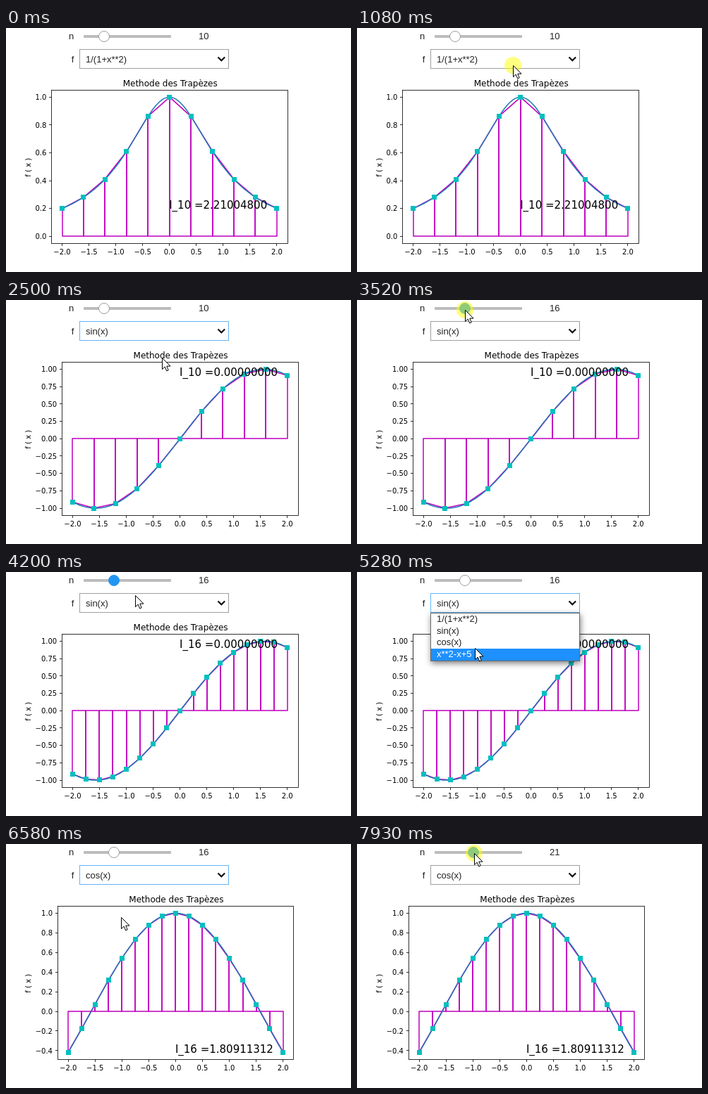
An HTML page that plays this animation: 489 px wide and 347 px high, repeating every 8000 ms.

```html
<!DOCTYPE html>
<html lang="fr">
<head>
<meta charset="utf-8">
<title>Methode des Trapèzes</title>
<style>
  html, body { margin: 0; width: 100%; height: 100%; overflow: hidden; background: #fff; }
  svg { display: block; }
  .ui text { font: 13px "Liberation Sans", Arial, sans-serif; fill: #222; }
  .plot text { font: 10px "DejaVu Sans", sans-serif; fill: #000; }
  .plot .title { font-size: 12px; }
  .plot .sum { font-size: 15px; }
  .end { text-anchor: end; }
  .mid { text-anchor: middle; }
  .axis { fill: none; stroke: #000; stroke-width: .8; }
  .trap { fill: none; stroke: #bf00bf; stroke-width: 1.5; stroke-linejoin: round; }
  .curve { fill: none; stroke: #1f77b4; stroke-width: 1.5; }
  #menu { filter: drop-shadow(1px 3px 4px rgba(0, 0, 0, .5)); }
</style>
</head>
<body>
<svg width="489" height="347" viewBox="0 0 489 347">
  <g id="plots"></g>
  <g class="ui">
    <text class="end" x="96.3" y="16">n</text>
    <rect x="110" y="10" width="124" height="4" rx="1" fill="#bdbdbd"/>
    <circle id="knob" cy="12" r="7.5"/>
    <text id="count" x="273" y="16"></text>
    <text class="end" x="96.3" y="49">f</text>
    <rect id="box" x="104.5" y="30.5" width="211" height="27" fill="#fff"/>
    <text id="choice" x="113" y="49"></text>
    <path d="M300.5 41.5L305.3 46.3L310.1 41.5" fill="none" stroke="#000" stroke-width="2"/>
    <g id="menu">
      <rect x="104.5" y="58.5" width="211" height="68" fill="#fff" stroke="#6b6b6b"/>
      <rect id="bar" x="105" width="210" height="17" fill="#1e90ff"/>
    </g>
  </g>
  <circle id="halo" r="12" fill="#ff0" fill-opacity=".5"/>
  <path id="arrow" d="M.5 .5V16.6L4.2 13.1L6.7 18.9L9.2 17.8L6.8 12.1H12Z" fill="#fff" stroke="#000"/>
</svg>
<script>
const $ = id => document.getElementById(id);
const LOOP = 8000, STEP = 70, ROW = 16.6, MENU_TOP = 58;
const names = ["1/(1+x**2)", "sin(x)", "cos(x)", "x**2-x+5"];

// Axes geometry in pixels; x covers -2.2 to 2.2
const TOP = 88.5, BOTTOM = 306, WIDTH = 334.8, MID = (TOP + BOTTOM) / 2;

const bell = { f: x => 1 / (1 + x * x), left: 64.3, min: 0, first: 0, step: .2, digits: 1 };
const sine = { f: Math.sin, left: 79.2, min: -1, first: -1, step: .25, digits: 2 };
const cosine = { f: Math.cos, left: 73, min: Math.cos(2), first: -.4, step: .2, digits: 1 };

const range = (n, fn) => Array.from({ length: n + 1 }, (_, i) => fn(i));
const fixed = (v, digits) => v.toFixed(digits).replace(/^-(0\.?0*)$/, "$1").replace("-", "\u2212");
const snap = v => Math.floor(v) + .5;

function drawPlot({ f, left, min, first, step, digits }, n) {
  const px = x => left + (x + 2.2) / 4.4 * WIDTH;
  const unit = (BOTTOM - TOP) / 1.1 / (1 - min);
  const py = y => BOTTOM - (BOTTOM - TOP) / 22 - (y - min) * unit;
  const at = (x, y) => px(x).toFixed(2) + " " + py(y).toFixed(2);
  const h = 4 / n, xs = range(n, i => -2 + i * h);
  const sum = xs.reduce((s, x, i) => s + f(x) * h * (i % n ? 1 : .5), 0);
  const center = left + WIDTH / 2, base = Math.round(py(0));
  let out = "";

  // Upright and level edges sit on whole pixels
  for (let i = 0; i < n; i++) {
    const [a, b] = [xs[i], xs[i + 1]];
    const [ax, bx] = [a, b].map(x => Math.round(px(x)));
    out += `<path class="trap" d="M${ax} ${base}V${py(f(a))}L${bx} ${py(f(b))}V${base}Z"/>`;
  }
  out += `<path class="curve" d="M${range(100, i => at(i / 25 - 2, f(i / 25 - 2))).join("L")}"/>`;
  for (const x of xs) {
    out += `<rect x="${Math.round(px(x) - 3.5)}" y="${Math.round(py(f(x)) - 3.5)}" width="7" height="7" fill="#00bfbf"/>`;
  }

  const edge = snap(left);
  out += `<rect class="axis" x="${edge}" y="${TOP}" width="${snap(left + WIDTH) - edge}" height="218"/>`;
  for (let x = -2; x <= 2; x += .5) {
    out += `<path class="axis" d="M${snap(px(x))} 306.5v3.5"/>
      <text class="mid" x="${px(x)}" y="321.5">${fixed(x, 1)}</text>`;
  }
  for (let y = first; y < 1.01; y += step) {
    out += `<path class="axis" d="M${edge} ${snap(py(y))}h-3.5"/>
      <text class="end" x="${left - 7}" y="${Math.round(py(y) + 3.8)}">${fixed(y, digits)}</text>`;
  }
  out += `<text class="mid" transform="translate(34.7 ${MID + 1}) rotate(-90)">f ( x )</text>
    <text class="title mid" x="${center + 1}" y="83">Methode des Trapèzes</text>
    <text class="sum" x="${px(0) - .5}" y="${Math.round(py(f(2)) + .8)}">I_${n} =${Math.abs(sum).toFixed(8)}</text>`;
  return `<g class="plot">${out}</g>`;
}

$("plots").innerHTML = [[bell, 10], [sine, 10], [sine, 16], [cosine, 16]].map(p => drawPlot(...p)).join("");
const plots = [...$("plots").children];

const svgNS = "http://www.w3.org/2000/svg";
const items = names.map((name, i) => {
  const el = document.createElementNS(svgNS, "text");
  el.setAttribute("x", 113);
  el.setAttribute("y", Math.round(71 + i * ROW));
  el.textContent = name;
  $("menu").append(el);
  return el;
});

// Pointer legs: start time, number of steps, end point, ease-out power
const legs = [
  [250, 10, 221, 53, 1.6],
  [1540, 7, 221, 82, 1.4],
  [2770, 4, 161, 25, 1.4],
  [3180, 3, 153, 14, 1],
  [3920, 5, 183, 33, 1],
  [4270, 3, 197, 37, 1],
  [5140, 3, 167, 108, 1.3],
  [5350, 2, 165, 115, 1],
  [5620, 4, 163, 104, 1],
  [7040, 8, 157, 15, 1.2],
  [7660, 2, 166, 13, 1]
];

function pointer(t) {
  let x = 330, y = 212;
  for (const [start, steps, ex, ey, power] of legs) {
    if (t < start) break;
    const k = Math.min(1, (Math.floor((t - start) / STEP) + 1) / steps);
    const p = 1 - (1 - k) ** power;
    x += (ex - x) * p;
    y += (ey - y) * p;
  }
  return [x, y];
}

const within = (t, spans) => spans.some(([a, b]) => t >= a && t < b);
const passed = (t, times) => times.filter(at => t >= at).length;
const set = (el, attrs) => { for (const k in attrs) el.setAttribute(k, attrs[k]); };
const show = (el, on) => { el.style.display = on ? "" : "none"; };

function render(t) {
  const [x, y] = pointer(t);
  const chosen = passed(t, [2220, 6250]);
  const n = [10, 16, 21][passed(t, [3520, 7930])];
  const current = passed(t, [2500, 3720, 6580]);
  plots.forEach((p, i) => show(p, i === current));

  const knobX = Math.round(139 + (n - 10) * 2.4);
  const active = within(t, [[3520, 4610], [7930, LOOP]]) ||
    (t >= 250 && Math.hypot(x - knobX, y - 12) < 8);
  set($("knob"), {
    cx: knobX,
    fill: active ? "#2196f3" : "#fff",
    stroke: active ? "#2196f3" : "#9e9e9e"
  });
  $("count").textContent = n;
  $("choice").textContent = names[chosen];
  set($("box"), { stroke: within(t, [[1150, 3520], [4680, 7930]]) ? "#64b5f6" : "#9e9e9e" });

  const hover = y > MENU_TOP ? Math.min(3, Math.floor((y - MENU_TOP) / ROW)) : chosen;
  show($("menu"), within(t, [[1150, 2220], [4680, 6250]]));
  set($("bar"), { y: Math.round(59 + hover * ROW) });
  items.forEach((el, i) => { el.style.fill = i === hover ? "#fff" : ""; });

  show($("halo"), within(t, [[1080, 1350], [3520, 3720], [4610, 4810], [6030, 6250], [7930, LOOP]]));
  set($("halo"), { cx: x, cy: y });
  show($("arrow"), t >= 250);
  set($("arrow"), { transform: `translate(${Math.round(x)} ${Math.round(y)})` });
}

let begin;
function tick(now) {
  begin ??= now;
  render((now - begin) % LOOP);
  requestAnimationFrame(tick);
}
render(0);
requestAnimationFrame(tick);
</script>
</body>
</html>
```
